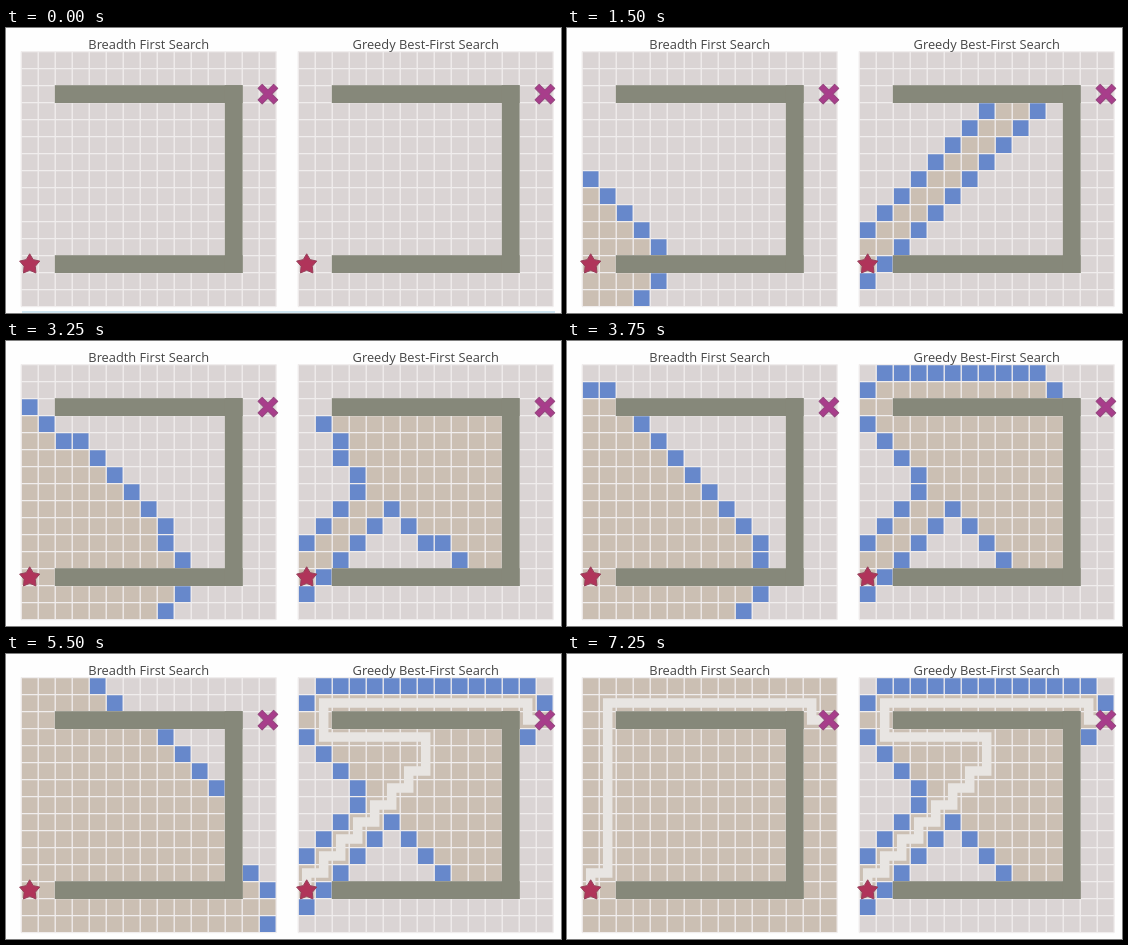
Write an HTML page with a canvas that moves like this. It is 555 px wide and 285 px high and loops after 8000 ms.

```html
<!DOCTYPE html>
<html lang="en">
<head>
<meta charset="utf-8">
<title>Search comparison</title>
<style>
  html, body { margin: 0; width: 100%; height: 100%; overflow: hidden; background: #fefefe; }
  canvas { display: block; }
</style>
</head>
<body>
<canvas id="stage" width="555" height="285"></canvas>
<script>
const ctx = document.getElementById('stage').getContext('2d');
const SIZE = 15, CELL = 17, TOP = 23.6;
const LOOP = 8000, TICK = 250, LAST_TICK = 29;
const START = [0, 12], GOAL = [14, 2];
const COLORS = {
  floor: '#dad4d4', visited: '#cbbfb3', frontier: '#6788cb', grid: '#f0eded',
  wall: '#86887a', path: '#e8e5e2', star: '#b0345a', cross: '#a83d8b', text: '#454545'
};
// [tick, number of expanded cells]
const PACE = [[6, 19], [9, 38], [13, 69], [18, 110], [22, 141], [29, 196]];

const id = (x, y) => y * SIZE + x;
const isWall = (x, y) =>
  x >= 2 && x <= 12 && y >= 2 && y <= 12 && (x === 12 || y === 2 || y === 12);

function neighbors(x, y) {
  const dirs = [[1, 0], [0, 1], [-1, 0], [0, -1]];
  if ((x + y) % 2 === 0) dirs.reverse(); // alternate so that paths run diagonally
  return dirs.map(([dx, dy]) => [x + dx, y + dy])
    .filter(([a, b]) => a >= 0 && b >= 0 && a < SIZE && b < SIZE && !isWall(a, b));
}

// Records when each cell is discovered and expanded, plus the final path.
function search(priority) {
  const queue = [{ pos: START, rank: 0 }];
  const found = new Map([[id(...START), 0]]);
  const expanded = new Map();
  const parent = new Map();
  let step = 0;
  while (queue.length) {
    const { pos } = queue.shift();
    expanded.set(id(...pos), ++step);
    if (id(...pos) === id(...GOAL)) break;
    for (const next of neighbors(...pos)) {
      const key = id(...next);
      if (found.has(key)) continue;
      found.set(key, step);
      parent.set(key, pos);
      queue.push({ pos: next, rank: priority(...next) });
    }
    queue.sort((a, b) => a.rank - b.rank);
  }
  const path = [];
  for (let p = GOAL; p; p = parent.get(id(...p))) path.push(p);
  return { found, expanded, path, total: step };
}

const panels = [
  { title: 'Breadth First Search', left: 15.2, run: search(() => 0) },
  { title: 'Greedy Best-First Search', left: 292.2,
    run: search((x, y) => Math.abs(x - GOAL[0]) + Math.abs(y - GOAL[1])) }
];

function stepsAt(tick) {
  if (tick <= 6) return Math.round(19 * (tick / 6) ** 1.7);
  const i = PACE.findIndex(([t]) => t >= tick);
  const [t0, n0] = PACE[i - 1], [t1, n1] = PACE[i];
  return Math.round(n0 + (n1 - n0) * (tick - t0) / (t1 - t0));
}

const center = ([x, y]) => [(x + 0.5) * CELL, (y + 0.5) * CELL];

function polygon(points, fill, edge) {
  ctx.beginPath();
  points.forEach(p => ctx.lineTo(...p));
  ctx.closePath();
  ctx.fillStyle = fill;
  ctx.fill();
  ctx.strokeStyle = edge;
  ctx.lineWidth = 1;
  ctx.lineJoin = 'round';
  ctx.stroke();
}

function drawStar([cx, cy]) {
  const points = Array.from({ length: 10 }, (_, i) => {
    const r = i % 2 ? 5.9 : 10.6, a = (i / 5 - 0.5) * Math.PI;
    return [cx + r * Math.cos(a), cy + 0.3 + r * Math.sin(a)];
  });
  polygon(points, COLORS.star, '#97405a');
}

function drawCross([cx, cy]) {
  const a = 11, b = 2.9;
  ctx.save();
  ctx.translate(cx + 0.2, cy);
  ctx.rotate(Math.PI / 4);
  polygon([[-a, -b], [-b, -b], [-b, -a], [b, -a], [b, -b], [a, -b],
           [a, b], [b, b], [b, a], [-b, a], [-b, b], [-a, b]], COLORS.cross, '#95477f');
  ctx.restore();
}

function drawGrid() {
  ctx.beginPath();
  for (let i = 0; i <= SIZE; i++) {
    const p = i * CELL, end = SIZE * CELL;
    ctx.moveTo(p, 0); ctx.lineTo(p, end);
    ctx.moveTo(0, p); ctx.lineTo(end, p);
  }
  ctx.strokeStyle = COLORS.grid;
  ctx.lineWidth = 1.3;
  ctx.stroke();
}

function drawWalls() {
  const wall = (x, y, w, h) =>
    ctx.fillRect(x * CELL - 0.4, y * CELL - 0.4, w * CELL + 0.8, h * CELL + 0.8);
  ctx.fillStyle = COLORS.wall;
  wall(2, 2, 11, 1);
  wall(2, 12, 11, 1);
  wall(12, 2, 1, 11);
}

function drawPath(path) {
  ctx.beginPath();
  path.forEach(p => ctx.lineTo(...center(p)));
  ctx.strokeStyle = COLORS.path;
  ctx.lineWidth = 9.5;
  ctx.lineJoin = 'miter';
  ctx.stroke();
}

function drawPanel({ title, left, run }, step) {
  ctx.save();
  ctx.translate(left, TOP);
  for (let y = 0; y < SIZE; y++) {
    for (let x = 0; x < SIZE; x++) {
      const key = id(x, y);
      const visited = run.expanded.get(key) <= step;
      const open = step > 0 && run.found.get(key) <= step;
      ctx.fillStyle = visited ? COLORS.visited : open ? COLORS.frontier : COLORS.floor;
      ctx.fillRect(x * CELL, y * CELL, CELL, CELL);
    }
  }
  drawGrid();
  drawWalls();
  if (step >= run.total) drawPath(run.path);
  drawStar(center(START));
  drawCross(center(GOAL));
  ctx.restore();

  ctx.fillStyle = COLORS.text;
  ctx.font = '12.85px "Open Sans", "Noto Sans", sans-serif';
  ctx.textAlign = 'center';
  ctx.fillText(title, left + SIZE * CELL / 2, 21);
}

function render() {
  const tick = Math.min(LAST_TICK, Math.floor(performance.now() % LOOP / TICK));
  ctx.fillStyle = '#fefefe';
  ctx.fillRect(0, 0, 555, 285);
  panels.forEach(panel => drawPanel(panel, stepsAt(tick)));
  if (tick === 0) {
    ctx.fillStyle = '#cfe5f1';
    ctx.fillRect(16, 283, 533, 2);
  }
  requestAnimationFrame(render);
}
render();
</script>
</body>
</html>
```
